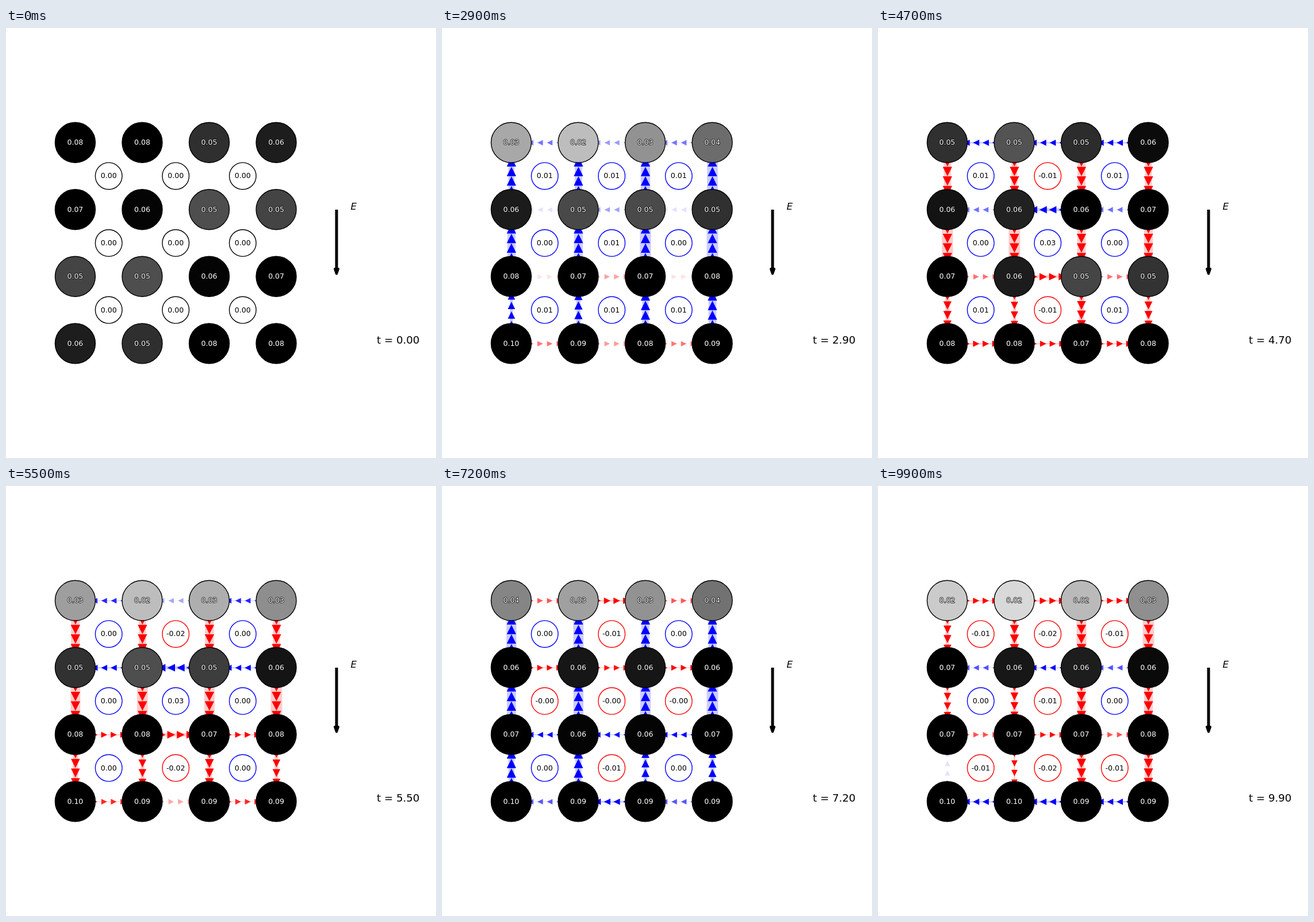
Recreate the animation shown at these times as an HTML page with a canvas. Size 748 px wide and 748 px high, loop 10000 ms.

```html
<!DOCTYPE html>
<html lang="en">
<head>
<meta charset="utf-8">
<title>Lattice currents in a field</title>
<style>
html, body { margin: 0; width: 100%; height: 100%; overflow: hidden; background: #fff; }
canvas { display: block; }
</style>
</head>
<body>
<canvas id="stage" width="748" height="748"></canvas>
<script>
const ctx = document.getElementById('stage').getContext('2d');
const SANS = '"DejaVu Sans", Verdana, sans-serif';
const { PI, sin, cos, exp, abs, min, max, round } = Math;
const STEP = 116.55;
const px = c => 120.4 + STEP * c, py = r => 199.2 + STEP * r;
const GREYS = [255, 240, 217, 189, 150, 115, 82, 37, 0];

// All densities and currents are in units of 1e-4.
const MEAN = 625;
const tilt = t => 80 * cos(t) + 130 * exp(-.01 * t * t) * cos(t / 2);
const ramp = t => min(1, t / 3);

// Standing waves of the density: wave numbers across and down, amplitude over time.
const waves = [
  [0, 1, t => -250 * (1 - exp(-.006 * t * t) * cos(1.514 * t))],
  [0, 2, t => 47 * cos(1.514 * t)],
  [0, 3, t => -45 * (1 - cos(2.17 * t))],
  [2, 0, t => 32],
  [1, 1, tilt],
  [3, 1, t => -.25 * tilt(t)],
  [1, 3, t => -60 * cos(1.93 * t)]
];

// Whirls of the current: the same, for the circulation around the squares.
const whirls = [
  [1, 1, t => 120 * sin(t / 2)],
  [3, 3, t => 90 * (1 - cos(1.9 * t))],
  [1, 3, t => ramp(t) * (80 * cos(1.19 * (t - 2.8)) - 50)],
  [3, 1, t => -50 * ramp(t) * cos(.4 * t)]
];

// Cosine shape on the sites, with even waves scaled to +1 and -1.
const shape = (k, i) => (k === 2 ? Math.SQRT2 : 1) * cos(PI * k * (i + .5) / 4);
const stiffness = (k, l) => 4 - 2 * cos(PI * k / 4) - 2 * cos(PI * l / 4);
const rate = (f, t) => (f(t + .001) - f(t - .001)) / .002;

const total = (list, term) => list.reduce((sum, [k, l, amp]) => sum + term(k, l, amp), 0);

const density = (c, r, t) => max(0, MEAN + total(waves,
  (k, l, amp) => amp(t) * shape(k, c) * shape(l, r)));

// Potential whose differences carry the change of density.
const potential = (c, r, t) => total(waves,
  (k, l, amp) => -rate(amp, t) * shape(k, c) * shape(l, r) / stiffness(k, l));

const whirl = (k, l, c, r) => sin(PI * k * (c + 1) / 4) * sin(PI * l * (r + 1) / 4);
const curl = (c, r, t) => total(whirls, (k, l, amp) => amp(t) * whirl(k, l, c, r));
const stream = (c, r, t) => total(whirls,
  (k, l, amp) => amp(t) * whirl(k, l, c, r) / stiffness(k, l));

function currents(t) {
  const list = [];
  for (let r = 0; r < 4; r++) {
    for (let c = 0; c < 4; c++) {
      const here = potential(c, r, t), swirl = stream(c, r, t);
      if (c < 3) list.push({ c, r, turn: 0,
        flow: here - potential(c + 1, r, t) + stream(c, r - 1, t) - swirl });
      if (r < 3) list.push({ c, r, turn: PI / 2,
        flow: here - potential(c, r + 1, t) + swirl - stream(c - 1, r, t) });
    }
  }
  return list;
}

function grey(v) {
  const u = min(v / MEAN, 1) * 8, i = min(u | 0, 7);
  const g = round(GREYS[i] + (GREYS[i + 1] - GREYS[i]) * (u - i));
  return `rgb(${g},${g},${g})`;
}

function disc(x, y, r, fill, stroke) {
  ctx.beginPath();
  ctx.arc(x, y, r, 0, 2 * PI);
  ctx.fillStyle = fill;
  ctx.fill();
  ctx.strokeStyle = stroke;
  ctx.lineWidth = 1.39;
  ctx.stroke();
}

function triangle(tipX, tipY, baseX1, baseY1, baseX2, baseY2) {
  ctx.beginPath();
  ctx.moveTo(tipX, tipY);
  ctx.lineTo(baseX1, baseY1);
  ctx.lineTo(baseX2, baseY2);
  ctx.closePath();
  ctx.fill();
}

function drawCurrent({ c, r, turn, flow }, peak) {
  const w = 20 * abs(flow) / peak, half = min(16.3, 9 + .7 * w) / 2;
  const alpha = min(1, w / 1.6), tip = flow > 0 ? half : -half;
  ctx.save();
  ctx.translate(px(c) + .4, py(r) + .4);
  ctx.rotate(turn);
  ctx.fillStyle = flow > 0 ? '#f00' : '#00f';
  ctx.globalAlpha = alpha * .2;
  ctx.fillRect(0, -w / 2, STEP, w);
  ctx.globalAlpha = alpha;
  for (let k = 2; k < 6; k++) {
    const x = STEP * k / 7;
    triangle(x + tip, 0, x - tip, -half, x - tip, half);
  }
  ctx.restore();
}

function drawField() {
  ctx.strokeStyle = ctx.fillStyle = '#000';
  ctx.lineJoin = 'round';
  ctx.lineWidth = 5;
  ctx.beginPath();
  ctx.moveTo(575, 316);
  ctx.lineTo(575, 424);
  ctx.stroke();
  ctx.lineWidth = 4;
  triangle(575, 427.5, 572, 419, 578, 419);
  ctx.stroke();
  ctx.textAlign = 'left';
  ctx.font = 'italic 16.67px ' + SANS;
  ctx.fillText('E', 599.5, 316);
}

function drawSite(c, r, t) {
  const value = density(c, r, t), text = (value / 1e4).toFixed(2);
  const x = px(c), y = py(r), base = round(y + 4);
  disc(x, y, 35, grey(value), '#000');
  ctx.strokeText(text, x, base);
  ctx.fillStyle = '#fff';
  ctx.fillText(text, x, base);
}

// Circulation is counted anticlockwise.
function drawSquare(c, r, t) {
  const value = curl(c, r, t), x = px(c + .5), y = py(r + .5);
  disc(x, y, 23.3, '#fff', value > 0 ? '#00f' : value < 0 ? '#f00' : '#000');
  ctx.fillStyle = '#000';
  ctx.fillText((value / 1e4).toFixed(2), x, round(y + 4));
}

function draw(t) {
  ctx.fillStyle = '#fff';
  ctx.fillRect(0, 0, 748, 748);
  const list = currents(t), peak = max(...list.map(e => abs(e.flow)));
  if (peak > 0) list.forEach(e => drawCurrent(e, peak));

  drawField();
  ctx.font = '18.2px ' + SANS;
  ctx.fillText('t = ' + t.toFixed(2), 645, 549);

  ctx.font = '12.5px ' + SANS;
  ctx.textAlign = 'center';
  for (let r = 0; r < 4; r++) {
    for (let c = 0; c < 4; c++) {
      drawSite(c, r, t);
      if (c < 3 && r < 3) drawSquare(c, r, t);
    }
  }
}

function tick() {
  draw(Math.floor(performance.now() % 10000 / 100) / 10);
  requestAnimationFrame(tick);
}
tick();
</script>
</body>
</html>
```
